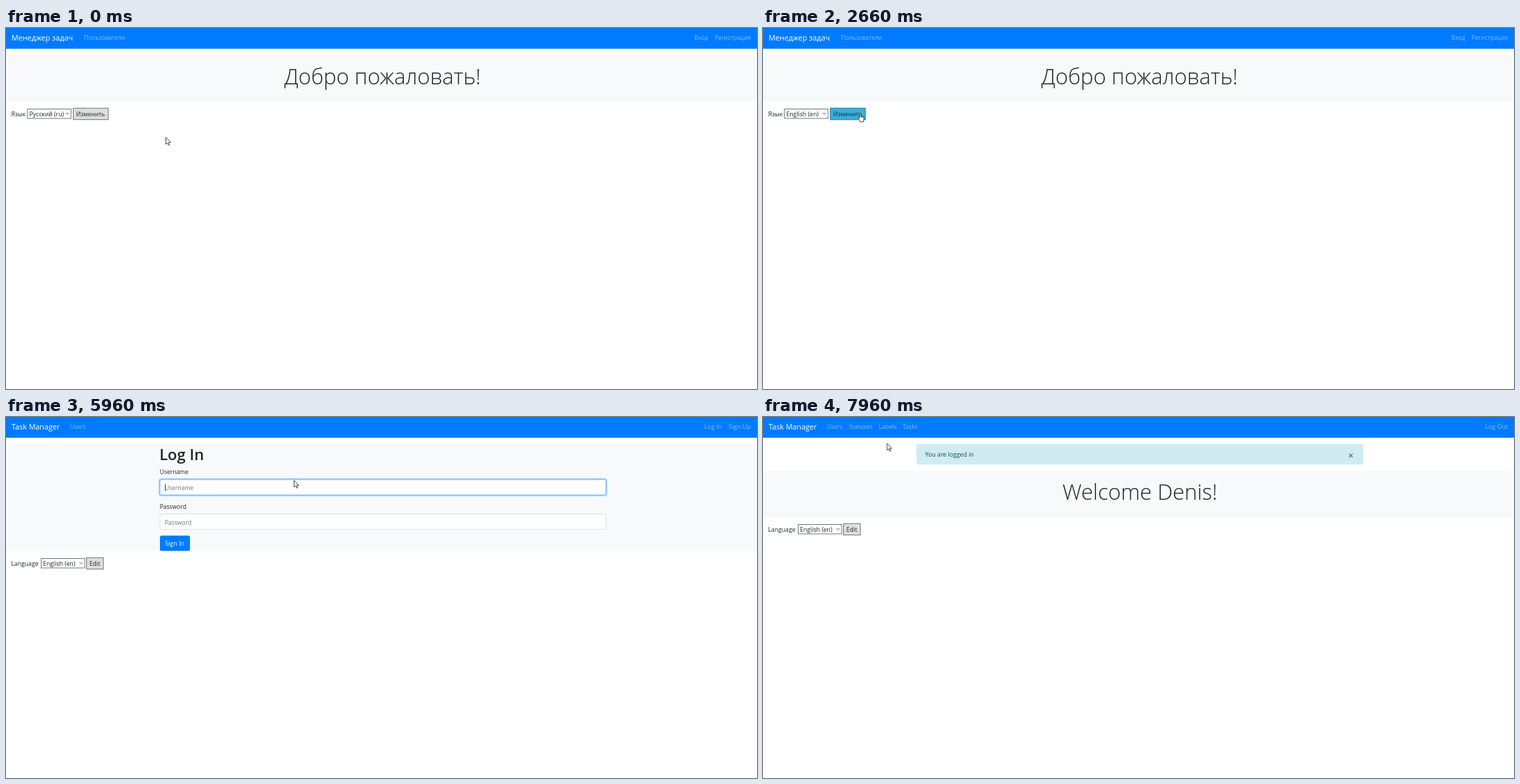
An HTML page for the animation above (7990 ms loop, 1078 by 519 pixels).

```html
<!DOCTYPE html>
<html lang="en">
<head>
<meta charset="utf-8">
<title>Task Manager</title>
<style>
  html, body { margin: 0; width: 100%; height: 100%; overflow: hidden; background: #fff; }
  svg { display: block; width: 1078px; height: 519px; }
  text { font-family: "Open Sans", "Noto Sans", sans-serif; fill: #212529; white-space: pre; }
  .brand { fill: #fff; }
  .link { fill: #80bdff; }
  .light { font-weight: 300; text-anchor: middle; }
  .title { font-weight: 600; }
  .hint { fill: #6c757d; }
  .white { fill: #fff; }
  .info { fill: #0c5460; }
  .filled { font-family: "Liberation Sans", Arial, sans-serif; fill: #000; }
</style>
</head>
<body>
<svg id="stage" viewBox="0 0 1078 519"></svg>
<script>
const LOOP = 7990;
const USER = "Denis";

const text = (x, y, str, size = 8.7, cls = "", id = "") =>
  `<text id="${id}" class="${cls}" x="${x}" y="${y}" font-size="${size}">${str}</text>`;
const rect = (x, y, w, h, fill, extra = "") =>
  `<rect x="${x}" y="${y}" width="${w}" height="${h}" fill="${fill}" ${extra}/>`;
const group = (id, body, extra = "") => `<g id="${id}" ${extra}>${body}</g>`;

const nav = (brand, brandSize, links) =>
  rect(0, 0, 1078, 29.8, "#007bff") +
  text(8, 18.4, brand, brandSize, "brand") +
  links.map(([x, str, size, id]) => text(x, 17.3, str, size, "link", id)).join("");

const band = (y, h) => rect(0, y, 1078, h, "#f8f9fa");

// Language label, select box and submit button
function langRow(id, dy, label, sx, value, bx, bw, action, size) {
  const line = 'stroke="#767676"';
  return group(id, text(7.3, 127, label, 8.7) +
    rect(sx, 116.5, 62.5, 13.5, "#fff", `${line} id="${id}Box"`) +
    rect(sx + 54, 117, 8, 12.5, "#ddd", `id="${id}Arrow" visibility="hidden"`) +
    text(sx + 2.6, 127, value, 8.7, "", id + "Value") +
    `<path d="M${sx + 54.9} 122l2.4 2.2 2.4-2.2" fill="none" stroke="#555" stroke-width=".9"/>` +
    rect(bx, 115.3, bw, 16.4, "#dedede", line) +
    rect(bx, 115.3, bw, 16.4, "#35b1e1", `stroke="#3585a5" id="${id}Hot" opacity="0"`) +
    text(bx + 4.2, 127, action, size), `transform="translate(0 ${dy})"`);
}
const enRow = (id, dy) => langRow(id, dy, "Language", 50.5, "English (en)", 115.6, 24.2, "Edit", 8.6);

const field = (y, id) =>
  rect(221, y, 640, 22, "#fff", `id="${id}" rx="2.2" stroke="#ced4da" stroke-width=".7"`);
const ring = (x, y, w, h, id) =>
  rect(x - .9, y - .9, w + 1.8, h + 1.8, "none",
    `id="${id}" rx="3" stroke="#007bff" stroke-opacity=".32" stroke-width="2.2"`);

const option = (y, str, id) =>
  rect(31.5, y, 61.5, 13.8, "#1e90ff", `id="${id}Bg"`) + text(33.6, y + 10, str, 8.7, "", id);

const ruPage = nav("Менеджер задач", 10.8, [
    [112, "Пользователи", 8.5], [988, "Вход", 8.4], [1017, "Регистрация", 8.5]]) +
  band(39, 66.5) + text(540.5, 81, "Добро пожаловать!", 31, "light") +
  langRow("ru", 0, "Язык", 30.8, "Русский (ru)", 96.5, 50.3, "Изменить", 8.5) +
  group("menu",
    rect(29, 132, 66, 28.5, "#000", 'opacity=".08" rx="2"') +
    rect(31, 131, 62.5, 28, "#fff", 'stroke="#999" stroke-width=".6"') +
    option(131.2, "Русский (ru)", "optRu") + option(145, "English (en)", "optEn"));

const enLinks = id => [[92, "Users", 8.4], [1002.5, "Log In", 8.9, id], [1037, "Sign Up", 9]];

const enPage = nav("Task Manager", 10.75, enLinks("login")) +
  band(39, 66.5) + text(540.5, 81, "Welcome!", 31, "light") + enRow("en", 0);

const loginPage = nav("Task Manager", 10.75, enLinks("login2")) +
  band(39, 153.7) + text(220.2, 62.4, "Log In", 22, "title") +
  text(220.7, 82, "Username", 8.5) + field(90, "name") + ring(221, 90, 640, 22, "nameRing") +
  text(220.7, 131.5, "Password", 8.5) + field(139.5, "pass") +
  group("empty", text(228, 104.9, "Username", 8.5, "hint") + text(228, 154.5, "Password", 8.5, "hint") +
    rect(228, 95.5, .7, 11.5, "#222")) +
  group("full", text(228.2, 104.8, USER, 7.8, "filled") +
    text(228.2, 154.3, "•".repeat(13), 7.8, "filled")) +
  rect(221, 170.5, 43, 22, "#007bff", 'rx="2.2"') +
  rect(221, 170.5, 43, 22, "#0069d9", 'rx="2.2" id="signHot"') +
  ring(221, 170.5, 43, 22, "signRing") +
  text(228.2, 185.2, "Sign In", 8.9, "white") + enRow("form", 87);

const homePage = nav("Task Manager", 10.75, [
    [92, "Users", 8.4], [123, "Statuses", 8.6], [166, "Labels", 8.7],
    [200.5, "Tasks", 8.5], [1036.5, "Log Out", 8.9]]) +
  rect(221, 39.4, 640, 28.4, "#d1ecf1", 'rx="2.2" stroke="#bee5eb" stroke-width=".8"') +
  text(232.7, 57.3, "You are logged in", 8.75, "info") +
  '<path d="M841.4 53l5 5m0-5l-5 5" stroke="#53777f" stroke-width="1.2"/>' +
  band(77.5, 66.5) + text(541, 119.3, `Welcome ${USER}!`, 31, "light") + enRow("home", 38);

const arrow = '<path d="M0 0V9.8L2.2 7.8 3.8 11.2 5.3 10.5 3.8 7.2H6.9Z" ' +
  'fill="#fff" stroke="#1c1c1c" stroke-width=".8" stroke-linejoin="round"/>';
const hand = '<path d="M-.9 .9A.9 .9 0 0 1 .9 .9V4.4L4.3 5.2Q5.6 5.6 5.5 7L4.9 10V12.6H-.5V11.4' +
  'L-3 7.9Q-3.4 6.5-2.2 6.5L-.9 7.6Z" fill="#fff" stroke="#1c1c1c" stroke-width=".8"/>' +
  '<path d="M.9 4.4V6.6M2.5 4.8V6.8M4.1 5.2V7" stroke="#1c1c1c" stroke-width=".6"/>';

const pages = [["pageRu", ruPage], ["pageEn", enPage], ["pageLogin", loginPage], ["pageHome", homePage]];
const starts = [0, 3660, 5430, 7170];

document.getElementById("stage").innerHTML =
  pages.map(([id, body]) => group(id, body)).join("") +
  group("cursor", group("arrow", arrow) + group("hand", hand));

const $ = id => document.getElementById(id);
const show = (id, on) => $(id).style.display = on ? "" : "none";
const set = (id, name, value) => $(id).setAttribute(name, value);
const ramp = (t, from, len = 150) => Math.max(0, Math.min(1, (t - from) / len));
const within = (t, from, to) => t >= from && t < to;

// Pointer strokes: start, end and the Bezier points between; each eases in and out
const strokes = [
  { from: 790, to: 1180, pts: [[229.5, 157.4], [150, 145], [64, 128]] },
  { from: 1590, to: 1770, pts: [[64, 128], [67, 146]] },
  { from: 2000, to: 2430, pts: [[67, 146], [100, 139], [139.6, 122.3]] },
  { from: 4330, to: 5020, pts: [[139.6, 122.3], [360, 235], [800, 60], [981.6, 8]] },
  { from: 5020, to: 5200, pts: [[981.6, 8], [1015.5, 13.3]] },
  { from: 5560, to: 5960, pts: [[1015.5, 13.3], [840, 78], [530, 82], [413.5, 91]] },
  { from: 5960, to: 6130, pts: [[413.5, 91], [390, 97]] },
  { from: 6230, to: 6440, pts: [[390, 97], [300, 165], [256.4, 177.4]] },
  { from: 6540, to: 6700, pts: [[256.4, 177.4], [254, 179.8]] },
  { from: 7430, to: 7750, pts: [[254, 179.8], [170, 92], [113.4, 45]] },
  { from: 7750, to: 7960, pts: [[113.4, 45], [135, 37], [178, 38]] }
];

const mix = (a, b, k) => [a[0] + (b[0] - a[0]) * k, a[1] + (b[1] - a[1]) * k];
const bezier = (pts, k) => pts.length === 1 ? pts[0] :
  bezier(pts.slice(1).map((p, i) => mix(pts[i], p, k)), k);

function pointAt(t) {
  const s = strokes.filter(s => s.from <= t).pop() || strokes[0];
  const k = ramp(t, s.from, s.to - s.from);
  return bezier(s.pts, k * k * (3 - 2 * k));
}

function draw(t) {
  const page = starts.filter(s => s <= t).length - 1;
  pages.forEach(([id], i) => show(id, i === page));

  const picked = t >= 1980;
  set("ruBox", "stroke", within(t, 1080, 2660) ? "#3cb0e0" : "#767676");
  set("ruArrow", "visibility", within(t, 1080, 2100) ? "inherit" : "hidden");
  $("ruValue").textContent = picked ? "English (en)" : "Русский (ru)";
  set("ruHot", "opacity", ramp(t, 2200, 120));
  show("menu", within(t, 1500, 1980));
  const onEn = t >= 1690;
  show("optRuBg", !onEn);
  show("optEnBg", onEn);
  $("optRu").style.fill = onEn ? "" : "#fff";
  $("optEn").style.fill = onEn ? "#fff" : "";

  set("enHot", "opacity", 1 - ramp(t, 4350, 120));
  $("login").style.fill = t >= 5100 ? "#bfdeff" : "";
  $("login2").style.fill = t < 5610 ? "#bfdeff" : "";

  const full = t >= 6230, blur = ramp(t, 6800);
  show("empty", !full);
  show("full", full);
  for (const id of ["name", "pass"]) set(id, "fill", full ? "#e8f0fe" : "#fff");
  set("name", "stroke", blur < .5 ? "#80bdff" : "#ced4da");
  set("nameRing", "opacity", 1 - blur);
  set("signHot", "opacity", ramp(t, 6390));
  set("signRing", "opacity", blur);

  const point = within(t, 2200, 4350) || within(t, 5100, 5610) || within(t, 6390, 7170);
  show("hand", point);
  show("arrow", !point);
  set("cursor", "transform", `translate(${pointAt(t)})`);
}

const begin = performance.now();
function tick() {
  draw((performance.now() - begin) % LOOP);
  requestAnimationFrame(tick);
}
tick();
</script>
</body>
</html>
```
